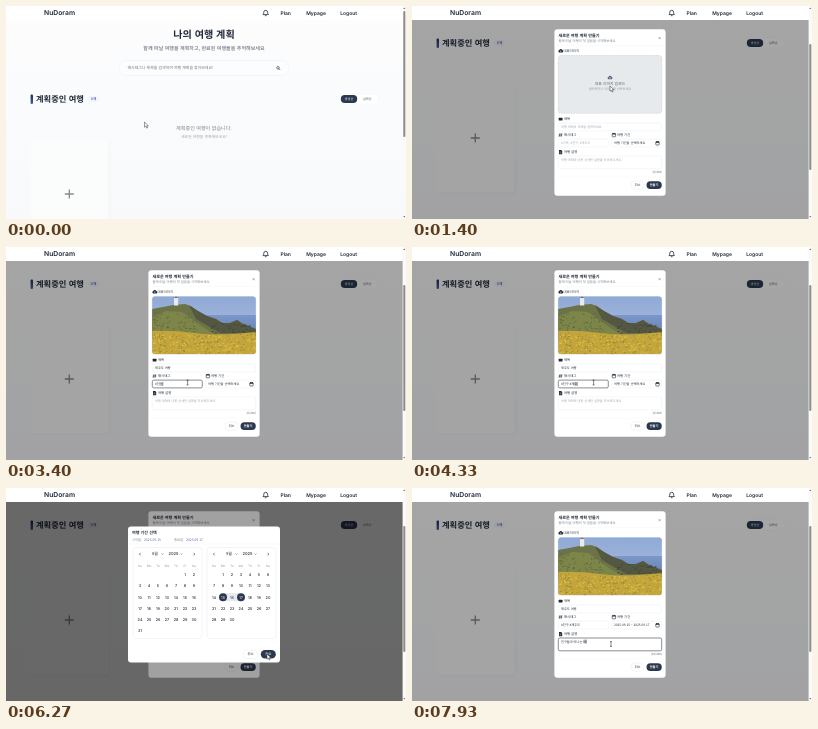
Animation, 400 px wide and 213 px high, one loop 8000 ms. Source, as an HTML page:

```html
<!DOCTYPE html>
<html lang="ko">
<head>
<meta charset="utf-8">
<title>여행 계획</title>
<style>
html, body { margin: 0; width: 100%; height: 100%; overflow: hidden; background: #fff; }
svg { display: block; width: 100vw; height: 100vh; }
text {
  font-family: "Noto Sans CJK KR", "Noto Sans CJK", "Noto Sans KR", sans-serif;
  white-space: pre; text-rendering: geometricPrecision;
}
.latin { font-family: Inter, sans-serif; }
</style>
</head>
<body>
<svg id="stage" viewBox="0 0 400 213" preserveAspectRatio="none"></svg>
<script>
const LOOP = 8000, SCROLL = 56;
const INK = '#1f2937', NAVY = '#2b3850', GRAY = '#7d838d', PALE = '#a2a7af', LINE = '#e6e8ec', BLUE = '#5468b8';

// y is the vertical middle of the line of text
const text = (x, y, size, str, fill = INK, more = '') =>
  `<text x="${x}" y="${(y + size * .36).toFixed(2)}" font-size="${size}" fill="${fill}" ${more}>${str}</text>`;
const rect = (x, y, w, h, r, fill, more = '') =>
  `<rect x="${x}" y="${y}" width="${w}" height="${h}" rx="${r}" fill="${fill}" ${more}/>`;
const path = (d, fill, more = '') => `<path d="${d}" fill="${fill}" ${more}/>`;
const stroke = (color, width = .5) => `stroke="${color}" stroke-width="${width}"`;
const group = (id, body, more = '') => `<g id="${id}" ${more}>${body}</g>`;
const MID = 'text-anchor="middle"', END = 'text-anchor="end"';
const BOLD = 'font-weight="700"', SEMI = 'font-weight="500"';

function seeded(seed) {
  return () => (seed = (seed * 16807) % 2147483647) / 2147483647;
}

function calendarIcon(x, y, color = INK) {
  return rect(x, y + .5, 3.4, 3.3, .5, 'none', stroke(color, .6)) + rect(x, y + .4, 3.4, 1.2, .3, color) +
    path(`M${x + .9} ${y - .2}v1M${x + 2.5} ${y - .2}v1`, 'none', stroke(color, .5));
}

function cloudIcon(x, y, color = INK) {
  return path(`M${x + .9} ${y + 3.2}a1.2 1.2 0 0 1 .1-2.3a1.6 1.6 0 0 1 3-.1a1.25 1.25 0 0 1 .1 2.4z`, color) +
    `<circle cx="${x + 2.5}" cy="${y + 1.9}" r=".6" fill="#fff"/>`;
}

function page() {
  const header = [[279.7, 'Plan'], [310, 'Mypage'], [342.7, 'Logout']]
    .map(([x, s]) => text(x, 7, 5, s, INK, `${MID} class="latin" font-weight="600"`)).join('');
  const content =
    text(198, 28, 10.1, '나의 여행 계획', INK, `${MID} ${BOLD}`) +
    text(198, 41.7, 5.05, '함께 떠날 여행을 계획하고, 완료된 여행들을 추억해보세요', '#4b5563', MID) +
    rect(113, 54.5, 170, 15, 7.5, '#fcfdfe', stroke('#edf0f3', .5)) +
    text(121.5, 62, 3.92, '해시태그나 제목을 검색하여 여행 계획을 찾아보세요!', '#70757e') +
    `<circle cx="272" cy="61.8" r="1.3" fill="none" ${stroke(INK, .6)}/>` +
    path('M273 62.8l1.1 1.1', 'none', stroke(INK, .7)) +
    rect(24.6, 88.5, 2.4, 9.5, 1, 'url(#bar)') +
    text(30, 93, 8.25, '계획중인 여행', INK, BOLD) +
    rect(82, 90, 11, 6, 3, '#f4f6fc') + text(87.5, 93, 3.5, '0개', BLUE, `${MID} ${BOLD}`) +
    rect(333.5, 87.8, 39, 10.4, 5.2, '#fff', stroke('#eef0f3', .4)) +
    rect(334.8, 89, 16.4, 8, 4, NAVY) +
    text(343, 93, 3.2, '생성순', '#fff', `${MID} ${SEMI}`) + text(361.3, 93, 3.2, '날짜순', '#555b66', `${MID} ${SEMI}`) +
    text(198, 121.8, 5.1, '계획중인 여행이 없습니다.', GRAY, MID) +
    text(198, 130.7, 3.85, '새로운 여행을 계획해보세요!', PALE, MID) +
    group('hover', rect(26, 137, 78, 108, 3, '#000', 'opacity=".16" filter="url(#soft)"')) +
    rect(25, 135, 77, 107, 3, '#fbfcfc', stroke('#fff', .4)) +
    path('M58.8 188h9M63.3 183.5v9', 'none', stroke('#858a91', 1.3));
  return rect(0, 0, 400, 213, 0, 'url(#paper)') + group('content', content) +
    group('dim1', rect(0, 0, 397, 213, 0, '#000', 'opacity=".35"')) +
    group('form', form()) +
    group('dim2', rect(0, 0, 397, 213, 0, '#000', 'opacity=".37"')) +
    group('picker', picker()) +
    rect(0, 0, 397, 14, 0, '#fff') +
    text(38, 7, 6.8, 'NuDoram', INK, 'class="latin" font-weight="600"') + header +
    path('M257 8.6q.8-.6.8-2.4a1.9 1.9 0 0 1 3.8 0q0 1.8.8 2.4z', 'none', stroke(INK, .8)) +
    path('M258.9 9.7h1.6', 'none', stroke(INK, .8)) +
    rect(396.6, 0, 3.4, 213, 0, '#fafafa') +
    path('M397.2 3l1.1-1.5l1.1 1.5zM397.2 210l1.1 1.5l1.1-1.5z', '#777') +
    rect(397.3, 5, 2, 126, 1, '#8b8b8b', 'id="thumb"');
}

function photo() {
  const random = seeded(41);
  const specks = (n, left, top, width, height, size) => Array.from({ length: n }, () => {
    const x = left + random() * width, y = top + random() * height;
    return `M${x.toFixed(1)} ${y.toFixed(1)}h${(size + random() * size).toFixed(1)}`;
  }).join('');
  return rect(146, 49, 104, 58, 0, 'url(#sky)') +
    rect(146, 68, 104, 20, 0, 'url(#sea)') +
    path('M146 62L157 60L167 58L179 57L185 59L192 64L201 69L210 72L216 76L224 76L231 73L237 77L250 82V92H146z', '#6c7348') +
    path('M183 58.5L192 64L201 69L210 72L216 76L224 76L231 73L237 77L250 82V87L214 86L202 79L190 72z', '#545742') +
    path('M146 70L160 64L176 65L186 72L197 80L208 87H146z', '#7d8549') +
    path(specks(70, 147, 65, 44, 20, 1), 'none', stroke('#59653a', .8)) +
    path(specks(40, 204, 76, 40, 10, 1), 'none', stroke('#3f4535', .9)) +
    rect(168, 50.5, 4.2, 8, .3, '#e8ebec') + path('M167.8 51q2.3-3 4.6 0z', '#6a717a') +
    path('M146 84q20-1 42 2t62-1v22h-104z', '#c3a53c') +
    path(specks(140, 146, 85, 104, 22, .9), 'none', stroke('#85843c', .8)) +
    path(specks(140, 146, 88, 104, 19, .9), 'none', stroke('#e6c443', .9));
}

const field = (id, x, y, w, h) => rect(x, y, w, h, 1.5, '#fff', `id="${id}Box"`);
const input = (id, x, y) => group(id, '<rect rx=".3" fill="#c3c8d0"/><text font-weight="500"/><path/>', `data-x="${x}" data-y="${y}"`);

function form() {
  const label = (x, y, s) => text(x, y, 3.35, s, INK, SEMI);
  return rect(142.4, 23.3, 111.2, 166.4, 3, '#fff') +
    text(146.4, 29.2, 4.1, '새로운 여행 계획 만들기', INK, BOLD) +
    text(146.4, 34.6, 3.35, '함께 떠날 여행의 첫 걸음을 시작해보세요.', GRAY) +
    path('M246.6 31.2l2 2m0-2l-2 2', 'none', stroke('#666', .5)) +
    path('M142.4 39.5h111.2M142.4 171h111.2', 'none', stroke('#f2f3f5', .4)) +
    cloudIcon(146.3, 43.2) + label(151.6, 45, '대표이미지') +
    rect(146.2, 49.5, 103.6, 57.8, 3, '#e7eaed', stroke('#b9c0c9', .5) + ' stroke-dasharray="1.5 1"') +
    cloudIcon(195.5, 70, '#586579') +
    text(198, 77.3, 3.85, '대표 이미지 업로드', '#5c6470', `${MID} ${SEMI}`) +
    text(198, 83.3, 3.15, '클릭하거나 이미지를 선택하세요', '#9298a1', MID) +
    group('photo', photo(), 'clip-path="url(#frame)"') +
    rect(146.7, 111.7, 3.8, 2.7, .5, INK) + label(152, 113, '제목') +
    path('M147.2 130.8l.8-3.6M149 130.8l.8-3.6M146.8 128.3h3.6M146.6 129.7h3.6', 'none', stroke(INK, .5)) +
    label(152, 129, '해시태그') + calendarIcon(200.2, 127) + label(205, 129, '여행 기간') +
    path('M147 144h2.2l1 1v3.2h-3.2z', INK) + path('M147.6 146h1.8m-1.8 1h1.8', 'none', stroke('#fff', .35)) +
    label(152, 146, '여행 설명') +
    field('title', 146.3, 117.1, 103.4, 7.8) + field('tag', 146.3, 133.1, 50, 7.8) +
    field('date', 199.6, 133.1, 50, 7.8) + field('desc', 146.3, 150, 103.4, 12.8) +
    input('title', 149, 121) + input('tag', 149, 137) + input('date', 202, 137) + input('desc', 149, 153.5) +
    calendarIcon(243.8, 135.2) +
    text(250, 166.3, 2.9, '', '#5b616b', `id="count" ${END}`) +
    rect(219, 175, 13, 8.2, 4.1, '#fff', stroke(LINE, .5)) + text(225.6, 179.1, 3.2, '취소', INK, `${MID} ${SEMI}`) +
    rect(234.5, 175.2, 15.3, 7.8, 3.9, NAVY) + text(242.1, 179.1, 3.2, '만들기', '#fff', `${MID} ${BOLD}`);
}

const COLUMN = 9, ROW = 11.1;
function month(left, name, offset, days) {
  const x = i => left + 7 + i * COLUMN;
  const digits = (cx, cy, size, s, fill) => text(cx, cy, size, s, fill, `${MID} ${SEMI} class="latin"`);
  let out = rect(left, 59.5, 69, 91, 3, '#fff', stroke('#e5e8ec', .5)) +
    path(`M${left + 7.6} 64.8l-1.3 1.3l1.3 1.3M${left + 60.5} 64.8l1.3 1.3l-1.3 1.3`, 'none', stroke(INK, .6)) +
    text(left + 19, 66, 4, name, INK, SEMI) + text(left + 35.5, 66, 4, '2025', INK, `${SEMI} class="latin"`) +
    path(`M${left + 28.5} 65.5l1 1l1-1M${left + 47.5} 65.5l1 1l1-1`, 'none', stroke(INK, .4));
  ['Su', 'Mo', 'Tu', 'We', 'Th', 'Fr', 'Sa'].forEach((d, i) => out += digits(x(i), 77.8, 3.1, d, PALE));
  for (let d = 1; d <= days; d++) {
    const cell = d - 1 + offset;
    out += digits(x(cell % 7), 87 + Math.floor(cell / 7) * ROW, 3.8, d, INK);
  }
  return out;
}

function picker() {
  const mark = (id, x, day) => group(id, rect(x - 4, 105.2, 8, 8, 4, NAVY) +
    text(x, 109.2, 3.8, day, '#fff', `${MID} class="latin"`));
  return rect(122, 38.5, 152, 136, 3, '#fff') +
    text(126, 44.7, 4.05, '여행 기간 선택', INK, BOLD) +
    text(126, 51.8, 3.3, '시작일:', GRAY) + text(138, 51.8, 3.4, '', BLUE, `id="from" ${SEMI}`) +
    text(168, 51.8, 3.3, '종료일:', GRAY) + text(180, 51.8, 3.4, '', BLUE, `id="to" ${SEMI}`) +
    path('M122 56h152', 'none', stroke('#eef0f2', .4)) +
    month(127, '8월', 5, 31) + month(201, '9월', 1, 30) +
    group('range', rect(217, 105.2, 18, 8, 0, '#e6e9ef') + text(226, 109.2, 3.8, '16', INK, `${MID} class="latin"`)) +
    mark('first', 217, 15) + mark('last', 235, 17) +
    rect(237, 162, 15, 8.6, 4.3, '#fff', stroke(LINE, .5)) + text(244.5, 166.3, 3.3, '취소', INK, `${MID} ${SEMI}`) +
    rect(254.8, 162, 15, 8.6, 4.3, '#9ca3b0', 'id="done"') + text(262.3, 166.3, 3.3, '완료', '#fff', `${MID} ${SEMI}`);
}

const gradient = (id, stops) => `<linearGradient id="${id}" x2="0" y2="1">` +
  stops.map((c, i) => `<stop offset="${i / (stops.length - 1)}" stop-color="${c}"/>`).join('') + '</linearGradient>';

document.getElementById('stage').innerHTML = '<defs>' +
  gradient('paper', ['#fdfdfe', '#fafbfc', '#f8f9fb']) + gradient('bar', ['#1f2d4d', '#4262ad']) +
  gradient('sky', ['#8fa9d6', '#b3c3df']) + gradient('sea', ['#7c97c8', '#6480b4']) +
  '<filter id="soft" x="-20%" y="-20%" width="140%" height="140%"><feGaussianBlur stdDeviation="2"/></filter>' +
  '<clipPath id="frame"><rect x="146.2" y="49.5" width="103.6" height="57.8" rx="3"/></clipPath></defs>' +
  page() +
  group('arrow', path('M0 0v5.2l1.3-1.1l.9 2l.9-.4l-.9-1.9h1.7z', '#fff', stroke('#333', .5))) +
  group('beam', path('M-1-2.4h2M0-2.4v4.8M-1 2.4h2', 'none', stroke('#222', .55)));

const $ = id => document.getElementById(id);
const show = (id, on) => $(id).setAttribute('visibility', on ? 'visible' : 'hidden');
const move = (id, x, y) => $(id).setAttribute('transform', `translate(${x} ${y})`);
const fade = (id, value) => $(id).setAttribute('opacity', value);
const ramp = (t, a, b) => Math.min(1, Math.max(0, (t - a) / (b - a)));
const ease = p => p * p * (3 - 2 * p);
const openness = (t, open, close) => ramp(t, open, open + 100) * (1 - ramp(t, close, close + 80));

// Keystrokes of a Hangul input method: lead, open syllable, full syllable
function keystrokes(str) {
  const leads = 'ㄱㄲㄴㄷㄸㄹㅁㅂㅃㅅㅆㅇㅈㅉㅊㅋㅌㅍㅎ', out = [];
  [...str].forEach((ch, i) => {
    const before = str.slice(0, i), n = ch.charCodeAt(0) - 0xac00;
    if (n >= 0) {
      out.push(before + leads[Math.floor(n / 588)]);
      if (n % 28) out.push(before + String.fromCharCode(0xac00 + n - n % 28));
    }
    out.push(before + ch);
  });
  return out;
}

const typing = {
  title: { keys: keystrokes('제주도 여행'), start: 2000, step: 35, focus: [1900, 2680], hint: '여행 계획의 제목을 입력하세요' },
  tag: { keys: keystrokes('#친구 #제주도'), start: 2880, step: 130, focus: [2680, 4780], hint: '#가족, #친구, #제주도' },
  date: { keys: ['2025.09.15 ~ 2025.09.17'], start: 6400, step: 1, focus: [0, 0], hint: '여행 기간을 선택하세요' },
  desc: { keys: keystrokes('친구들과 떠나는 여'), start: 7200, step: 35, focus: [7100, LOOP], hint: '여행 계획에 대한 상세한 설명을 작성해주세요.' }
};

function drawField(id, t) {
  const { keys, start, step, focus, hint } = typing[id];
  const index = Math.min(keys.length - 1, Math.floor((t - start) / step));
  const value = index < 0 ? '' : keys[index];
  const focused = t >= focus[0] && t < focus[1];
  const box = $(id + 'Box');
  box.setAttribute('stroke', focused ? '#3a4049' : LINE);
  box.setAttribute('stroke-width', focused ? .6 : .4);

  const g = $(id), [block, label, caret] = g.children;
  const x = +g.dataset.x, y = +g.dataset.y, size = 3.2;
  label.textContent = value || hint;
  label.setAttribute('x', x);
  label.setAttribute('y', y + size * .36);
  label.setAttribute('font-size', size);
  label.setAttribute('fill', value || id === 'date' ? INK : PALE);

  const width = value ? label.getComputedTextLength() : 0;
  const composing = focused && /[ㄱ-힣]$/.test(value) && t < start + keys.length * step + 80;
  const attrs = { x: x + width - 3, y: y - 1.9, width: 3, height: 3.8, visibility: composing ? 'visible' : 'hidden' };
  for (const name in attrs) block.setAttribute(name, attrs[name]);
  caret.setAttribute('d', `M${x + width + .2} ${y - 1.9}v3.8`);
  caret.setAttribute('stroke', '#222');
  caret.setAttribute('stroke-width', .4);
  caret.setAttribute('visibility', focused && (composing || t < start) ? 'visible' : 'hidden');
  return value;
}

const pointer = [
  [0, 138.5, 116], [100, 138.5, 116], [480, 71, 136], [850, 71, 136], [1200, 198, 80], [1600, 198, 80],
  [1880, 178, 121], [2350, 178, 121], [2510, 181.6, 135.5], [4600, 181.6, 135.5], [4760, 225, 137],
  [4880, 225, 137], [5100, 249, 137], [5250, 249, 137], [5480, 217, 109], [5620, 217, 109], [5850, 235, 109],
  [5980, 235, 109], [6260, 261, 166], [6800, 261, 166], [7080, 199, 156], [LOOP, 199, 156]
];

function drawPointer(t) {
  const i = pointer.findIndex(p => p[0] > t);
  const [t0, x0, y0] = pointer[i - 1], [t1, x1, y1] = pointer[i];
  const p = ease(ramp(t, t0, t1)), x = x0 + (x1 - x0) * p, y = y0 + (y1 - y0) * p;
  const overText = (t > 1860 && t < 4660) || t > 7040;
  show('arrow', !overText);
  show('beam', overText);
  move(overText ? 'beam' : 'arrow', x, y);
}

function render(t) {
  const scroll = ease(ramp(t, 70, 400));
  move('content', 0, -SCROLL * scroll);
  $('thumb').setAttribute('y', 5 + 33 * scroll);
  fade('hover', .15 + .85 * ramp(t, 400, 500) * (1 - ramp(t, 900, 1000)));

  const formOpacity = openness(t, 520, LOOP), pickerOpacity = openness(t, 4830, 6340);
  ['dim1', 'form'].forEach(id => fade(id, formOpacity));
  ['dim2', 'picker'].forEach(id => fade(id, pickerOpacity));
  show('photo', t >= 1470);

  const values = Object.keys(typing).map(id => drawField(id, t));
  $('count').textContent = `(${values[3].length}/200)`;

  const first = t >= 5540, last = t >= 5900;
  show('first', first);
  show('last', last);
  show('range', last);
  $('from').textContent = first ? '2025.09.15' : '날짜를 선택하세요';
  $('to').textContent = last ? '2025.09.17' : '날짜를 선택하세요';
  $('done').setAttribute('fill', last ? NAVY : '#9ca3b0');
  drawPointer(t);
}

const begin = performance.now();
function tick() {
  render((performance.now() - begin) % LOOP);
  requestAnimationFrame(tick);
}
tick();
</script>
</body>
</html>
```
